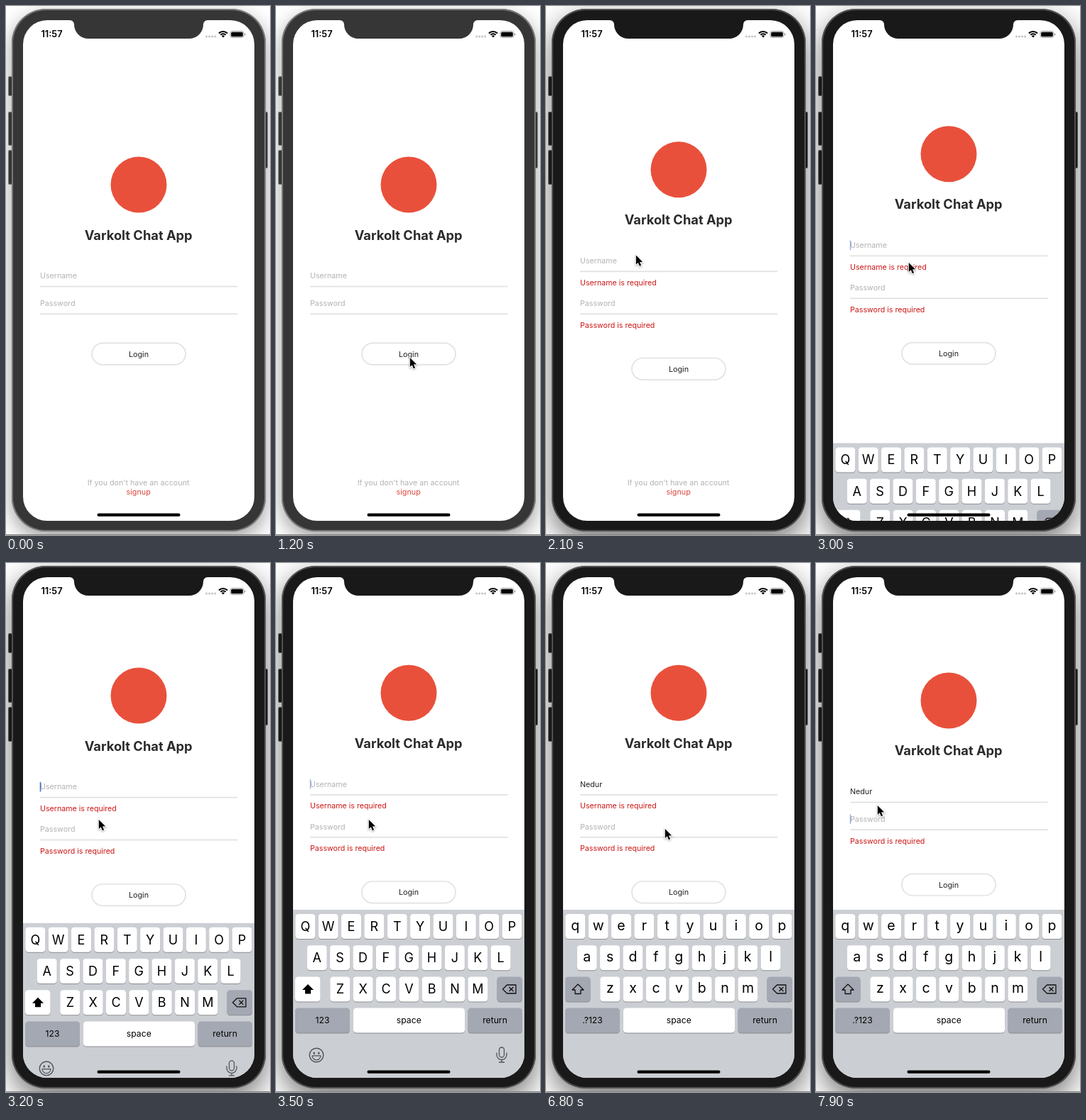
An HTML page with a canvas that plays this animation: 372 by 746 pixels, repeating every 8 s.

```html
<!DOCTYPE html>
<html lang="en">
<head>
<meta charset="utf-8">
<title>Login screen</title>
<style>
html, body { margin: 0; width: 100%; height: 100%; overflow: hidden; background: #fff; }
canvas { display: block; width: 372px; height: 746px; }
</style>
</head>
<body>
<canvas id="stage"></canvas>
<script>
const W = 372, H = 746, LOOP = 8000;
const FONT = 'Inter, "Open Sans", sans-serif';
const NAME = 'Nedur';
const KEYSTROKES = [4300, 4700, 5150, 5500, 5850];
const ACTIVE_AT = 1350, ERRORS_AT = 1700, FOCUS_AT = 2900;
const PASSWORD_AT = 6650, VALID_AT = 7400;
const ERROR_H = 21.2;
const BODY_R = 48, SCREEN_R = 34;

// time, x, y of the pointer tip
const POINTER = [
  [800, 226, 560], [1050, 188, 495], [1780, 188, 495], [2080, 126, 350.5],
  [2450, 130, 361], [6300, 130, 361], [6750, 167, 374], [7300, 167, 374], [7800, 86, 341]
];

const canvas = document.getElementById('stage');
const ctx = canvas.getContext('2d');
const dpr = window.devicePixelRatio || 1;
canvas.width = W * dpr;
canvas.height = H * dpr;

const clamp = (v) => Math.max(0, Math.min(1, v));
const smooth = (v) => v * v * (3 - 2 * v);

function rounded(x, y, w, h, r, fill) {
  ctx.beginPath();
  ctx.roundRect(x, y, w, h, r);
  if (fill) {
    ctx.fillStyle = fill;
    ctx.fill();
  }
}

function text(str, x, y, size, color, align = 'left', weight = 400) {
  ctx.font = `${weight} ${size}px ${FONT}`;
  ctx.textAlign = align;
  ctx.fillStyle = color;
  ctx.fillText(str, x, y);
}

function poly(points, close = true) {
  ctx.beginPath();
  points.forEach(([x, y]) => ctx.lineTo(x, y));
  if (close) ctx.closePath();
}

function stroke(color, width) {
  ctx.strokeStyle = color;
  ctx.lineWidth = width;
  ctx.stroke();
}

function drawPhone(active) {
  const body = active ? '#191919' : '#363636';
  const rim = active ? '#505050' : '#777';
  ctx.fillStyle = '#fff';
  ctx.fillRect(0, 0, W, H);

  ctx.save();
  ctx.shadowColor = active ? 'rgba(0,0,0,.55)' : 'rgba(0,0,0,.38)';
  ctx.shadowBlur = (active ? 38 : 28) * dpr;
  ctx.shadowOffsetY = (active ? 14 : 10) * dpr;
  rounded(8, 4, 358, 737, BODY_R, rim);
  ctx.restore();

  [[3, 99, 28], [3, 149, 48], [3, 203, 49], [363, 149, 80]].forEach(([x, y, h]) => {
    rounded(x, y, 6, h, 2, rim);
    rounded(x + 1, y + 1, 4, h - 2, 1.5, body);
  });
  rounded(8, 4, 358, 737, BODY_R, rim);
  rounded(10, 6, 354, 733, BODY_R - 2, body);
  rounded(24, 20, 326, 706, SCREEN_R, '#fff');

  ctx.fillStyle = '#858585';
  ctx.fillRect(0, 745, W, 1);
  return body;
}

function drawStatus(body) {
  ctx.beginPath();
  ctx.moveTo(88, 19);
  ctx.lineTo(90, 20);
  ctx.arcTo(96, 20, 96, 26, 6);
  ctx.arcTo(96, 46, 116, 46, 20);
  ctx.arcTo(278, 46, 278, 26, 20);
  ctx.arcTo(278, 20, 284, 20, 6);
  ctx.lineTo(286, 19);
  ctx.fillStyle = body;
  ctx.fill();

  text('11:57', 64.5, 44.4, 12.8, '#000', 'center', 600);
  for (let i = 0; i < 4; i++) rounded(281 + i * 4, 41.5, 3, 3, 1.5, '#c4c4c4');

  ctx.lineCap = 'butt';
  [8.3, 5].forEach((r) => {
    ctx.beginPath();
    ctx.arc(306, 44.2, r, -Math.PI * 0.76, -Math.PI * 0.24);
    stroke('#000', 2);
  });
  ctx.beginPath();
  ctx.moveTo(306, 44.4);
  ctx.arc(306, 44.4, 3, -Math.PI * 0.76, -Math.PI * 0.24);
  ctx.fillStyle = '#000';
  ctx.fill();

  rounded(316, 35.5, 19, 9, 2.8);
  stroke('#999', 0.9);
  rounded(317.2, 36.7, 16.6, 6.6, 1.6, '#000');
  rounded(336, 38.5, 1.3, 3, 0.6, '#999');
}

// blinks once a second, restarting at every keystroke
function caretAlpha(t) {
  if (t < 2950 || (t >= PASSWORD_AT && t < 6850)) return 0;
  const last = Math.max(...[2950, ...KEYSTROKES, 6850].filter((m) => m <= t));
  const age = t - last;
  if (KEYSTROKES.includes(last) && age < 500) return 1;
  const p = age % 1000;
  return Math.min(clamp(p / 100), clamp((600 - p) / 100));
}

function drawField(label, value, y, error, caret) {
  text(value || label, 48, y + 4, 10.7, value ? '#222' : '#b2b2b2');
  const end = value ? ctx.measureText(value).width + 0.5 : 0;
  if (caret > 0) {
    ctx.globalAlpha = caret;
    ctx.fillStyle = '#4470c4';
    ctx.fillRect(47.7 + end, y - 6.5, 1.6, 13.5);
    ctx.globalAlpha = 1;
  }
  ctx.fillStyle = '#e1e1e1';
  ctx.fillRect(48, y + 14.4, 278.5, 1.7);
  if (error) text(label + ' is required', 48, y + 34.7, 10.65, '#cc1716');
}

function drawForm(t, lift) {
  const userError = t >= ERRORS_AT && t < VALID_AT;
  const passError = t >= ERRORS_AT;
  const count = userError + passError;
  const cy = 252 - count * ERROR_H / 2 - 47.5 * lift;

  ctx.beginPath();
  ctx.arc(187, cy, 39.5, 0, Math.PI * 2);
  ctx.fillStyle = '#e9503b';
  ctx.fill();
  text('Varkolt Chat App', 186.7, cy + 77.5, 18.3, '#2b2b2b', 'center', 700);

  const typed = NAME.slice(0, KEYSTROKES.filter((k) => k <= t).length);
  const caret = caretAlpha(t);
  const onPass = t >= PASSWORD_AT;
  drawField('Username', typed, cy + 128.3, userError, onPass ? 0 : caret);
  drawField('Password', '', cy + 167 + userError * ERROR_H, passError, onPass ? caret : 0);

  const by = cy + 238.6 + count * ERROR_H;
  rounded(121, by - 15.3, 132, 30.6, 15.3);
  stroke('#e2e2e2', 1.7);
  text('Login', 187, by + 4, 10.8, '#222', 'center');

  text("If you don't have an account", 186.5, 675.5, 10.7, '#b2b2b2', 'center');
  text('signup', 186.7, 689, 10.8, '#d9483f', 'center');
}

function key(x, y, w, fill = '#fff') {
  rounded(x, y + 1, w, 35, 4.2, '#8b8d92');
  rounded(x, y, w, 35, 4.2, fill);
}

function drawShift(x, y, filled) {
  poly([[0, -7.5], [8, 0.5], [4, 0.5], [4, 6], [-4, 6], [-4, 0.5], [-8, 0.5]]
    .map(([a, b]) => [x + a, y + b]));
  ctx.lineJoin = 'round';
  if (filled) {
    ctx.fillStyle = '#000';
    ctx.fill();
  } else {
    stroke('#111', 1.3);
  }
}

function drawDelete(x, y) {
  poly([[-9.5, 0], [-3.5, -6], [9, -6], [9, 6], [-3.5, 6]].map(([a, b]) => [x + a, y + b]));
  ctx.lineJoin = 'round';
  stroke('#111', 1.3);
  [1, -1].forEach((s) => {
    poly([[x - 0.5, y - 3 * s], [x + 5.5, y + 3 * s]], false);
    stroke('#111', 1.3);
  });
}

function drawSmiley(x, y) {
  ctx.beginPath();
  ctx.arc(x, y, 9.8, 0, Math.PI * 2);
  stroke('#50555c', 1.4);
  rounded(x - 4.4, y - 4.6, 2.2, 3.6, 1.1, '#50555c');
  rounded(x + 2.2, y - 4.6, 2.2, 3.6, 1.1, '#50555c');
  ctx.beginPath();
  ctx.arc(x, y + 0.8, 6, 0, Math.PI);
  ctx.closePath();
  stroke('#50555c', 1.2);
}

function drawMic(x, y) {
  rounded(x - 3.5, y - 10.5, 7, 14, 3.5);
  stroke('#50555c', 1.3);
  ctx.beginPath();
  ctx.moveTo(x - 7, y - 3);
  ctx.lineTo(x - 7, y);
  ctx.arc(x, y, 7, Math.PI, 0, true);
  ctx.lineTo(x + 7, y - 3);
  ctx.moveTo(x, y + 7);
  ctx.lineTo(x, y + 10.5);
  ctx.moveTo(x - 4, y + 10.5);
  ctx.lineTo(x + 4, y + 10.5);
  stroke('#50555c', 1.3);
}

function drawKeyboard(t, lift) {
  if (lift <= 0) return;
  const upper = t < KEYSTROKES[0];
  const secure = t >= PASSWORD_AT;
  const gray = '#a4a8b2';

  ctx.save();
  rounded(24, 20, 326, 706, SCREEN_R);
  ctx.clip();
  ctx.translate(0, 489 + 237 * (1 - lift));
  ctx.fillStyle = '#cbced3';
  ctx.fillRect(24, 0, 326, 240);

  ['qwertyuiop', 'asdfghjkl', 'zxcvbnm'].forEach((row, r) => {
    const y = 6 + r * 44.2;
    const first = [41.3, 57.7, 90.3][r];
    [...row].forEach((ch, i) => {
      const x = first + i * 32.36;
      key(x - 14, y, 28);
      if (upper) text(ch.toUpperCase(), x, y + 24, 18, '#000', 'center');
      else text(ch, x, y + 23, 19.5, '#000', 'center');
    });
  });

  key(27, 94.4, 35.5, upper ? '#fff' : gray);
  drawShift(45, 112.5, upper);
  key(311.5, 94.4, 35.5, gray);
  drawDelete(329, 112);

  key(27, 138.6, 77, gray);
  key(109, 138.6, 157);
  key(270.5, 138.6, 76.5, gray);
  text(secure ? '.?123' : '123', 65.5, 160.4, 12.2, '#000', 'center');
  text('space', 187.3, 160, 12.2, '#000', 'center');
  text('return', 308.5, 160, 12.2, '#000', 'center');

  if (!secure) {
    drawSmiley(57, 205);
    drawMic(318, 204.5);
  }
  ctx.restore();
}

function drawPointer(t) {
  if (t < POINTER[0][0]) return;
  let [, x, y] = POINTER[POINTER.length - 1];
  for (let i = 1; i < POINTER.length; i++) {
    const a = POINTER[i - 1], b = POINTER[i];
    if (t < b[0]) {
      const k = smooth((t - a[0]) / (b[0] - a[0]));
      x = a[1] + (b[1] - a[1]) * k;
      y = a[2] + (b[2] - a[2]) * k;
      break;
    }
  }
  ctx.save();
  ctx.translate(x + 0.8, y + 1);
  ctx.scale(0.91, 0.91);
  poly([[0, 0], [0, 14.2], [3.2, 11.3], [5.6, 16.7], [8, 15.6], [5.7, 10.4], [10.2, 10.2]]);
  ctx.lineJoin = 'miter';
  ctx.shadowColor = 'rgba(0,0,0,.35)';
  ctx.shadowBlur = 2.5 * dpr;
  ctx.shadowOffsetY = dpr;
  stroke('#fff', 2.2);
  ctx.shadowColor = 'transparent';
  ctx.fillStyle = '#000';
  ctx.fill();
  ctx.restore();
}

function draw(t) {
  ctx.setTransform(dpr, 0, 0, dpr, 0, 0);
  const lift = 1 - Math.pow(1 - clamp((t - FOCUS_AT) / 500), 2.75);
  const body = drawPhone(t >= ACTIVE_AT);
  drawForm(t, lift);
  drawKeyboard(t, lift);
  drawStatus(body);
  rounded(128.5, 715.6, 117, 4.2, 2.1, '#000');
  drawPointer(t);
}

const start = performance.now();
function tick() {
  draw((performance.now() - start) % LOOP);
  requestAnimationFrame(tick);
}
tick();
</script>
</body>
</html>
```
